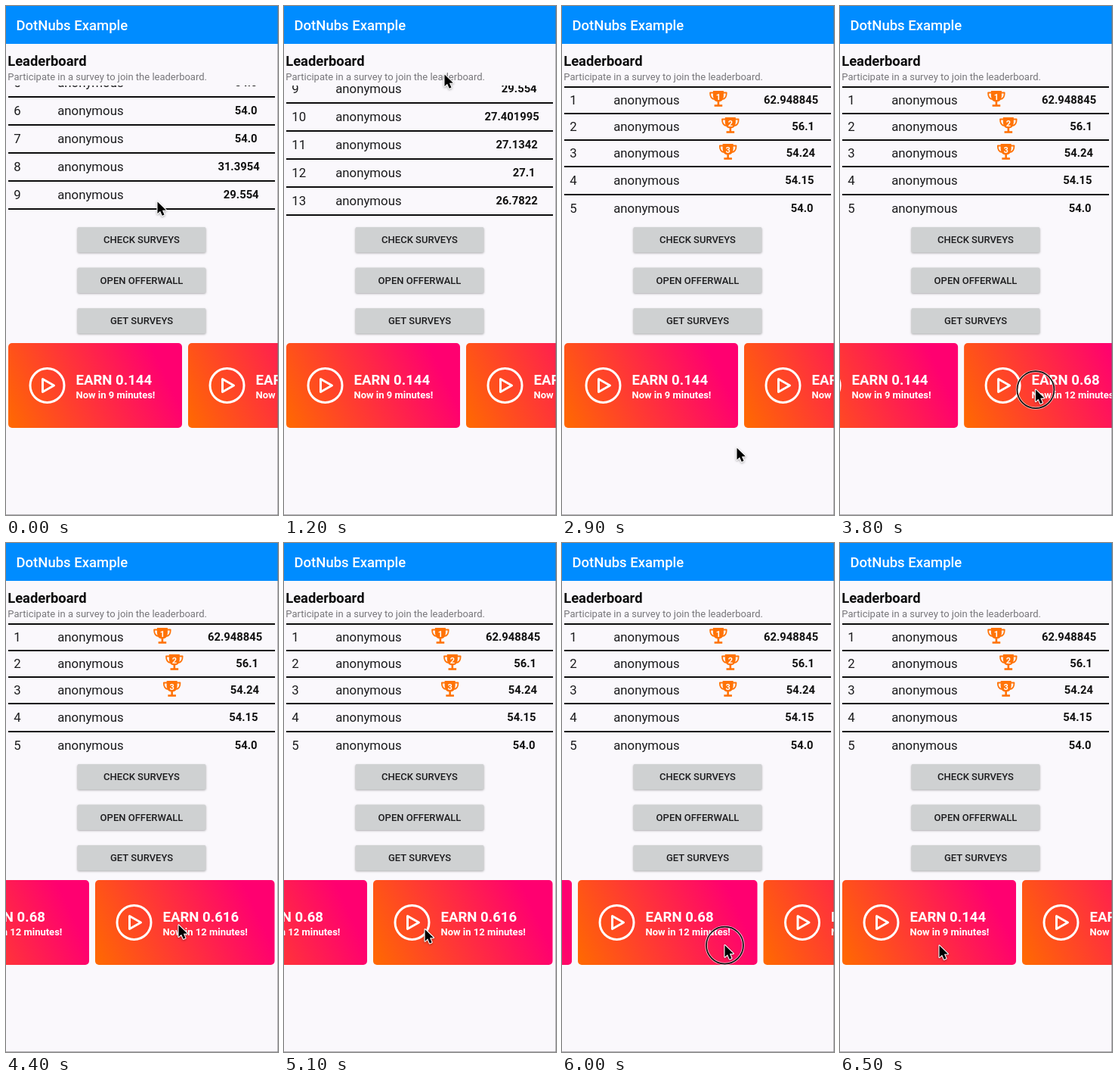
An HTML page with a canvas that plays this animation: 360 by 672 pixels, repeating every 6.6 s.

```html
<!DOCTYPE html>
<html lang="en">
<head>
<meta charset="utf-8">
<title>Leaderboard</title>
<style>
html, body { margin: 0; width: 100%; height: 100%; overflow: hidden; background: #faf8fc; }
canvas { display: block; width: 360px; height: 672px; }
</style>
</head>
<body>
<canvas id="stage"></canvas>
<script>
const W = 360, H = 672, LOOP = 6600, STEP = 100;
const canvas = document.getElementById('stage');
const ctx = canvas.getContext('2d');
const dpr = window.devicePixelRatio || 1;
canvas.width = W * dpr;
canvas.height = H * dpr;

const SCORES = ['62.948845', '56.1', '54.24', '54.15', '54.0', '54.0', '54.0', '31.3954',
  '29.554', '27.401995', '27.1342', '27.1', '26.7822', '25.435', '25.056'];
const BUTTONS = ['CHECK SURVEYS', 'OPEN OFFERWALL', 'GET SURVEYS'];
const CARDS = [
  { w: 230, pay: '0.144', min: 9 },
  { w: 237.5, pay: '0.68', min: 12 },
  { w: 237.5, pay: '0.616', min: 12 }
];

// Pointer gestures; the touch ring shows while dragging
const MOVES = [
  { from: 400, to: 1150, dx: 12, dy: -168, drag: true },
  { from: 1350, to: 1700, dx: 0, dy: 54 },
  { from: 1800, to: 2650, dx: 19, dy: 439, drag: true },
  { from: 2900, to: 3500, dx: 70, dy: -74 },
  { from: 3550, to: 4000, dx: -73, dy: -5, drag: true },
  { from: 4900, to: 5400, dx: -119, dy: 16 },
  { from: 5615, to: 6050, dx: 110, dy: 11, drag: true },
  { from: 6050, to: 6450, dx: -88, dy: 0 }
];

function smooth(t, from, to) {
  const u = Math.min(1, Math.max(0, (t - from) / (to - from)));
  return u * u * (3 - 2 * u);
}

const listScroll = t => 165.6 + 205.9 * smooth(t, 400, 1685) - 371.5 * smooth(t, 1800, 2650);
const cardScroll = t => 368.5 * (smooth(t, 3550, 4400) - smooth(t, 5615, 6500));

function pointer(t) {
  const p = { x: 200, y: 258, pressed: false };
  for (const { from, to, dx, dy, drag } of MOVES) {
    const k = smooth(t, from, to);
    p.x += dx * k;
    p.y += dy * k;
    if (drag && t >= from && t < to) p.pressed = true;
  }
  return p;
}

function text(str, x, y, size, weight, color, align = 'left') {
  ctx.font = `${weight} ${size}px Roboto, sans-serif`;
  ctx.fillStyle = color;
  ctx.textAlign = align;
  ctx.fillText(str, x, y);
}

function rect(x, y, w, h, color) {
  ctx.fillStyle = color;
  ctx.fillRect(x, y, w, h);
}

function round(x, y, w, h, r, fill) {
  ctx.beginPath();
  ctx.roundRect(x, y, w, h, r);
  ctx.fillStyle = fill;
  ctx.fill();
}

function shadow(color, blur, dy) {
  ctx.shadowColor = color;
  ctx.shadowBlur = blur * dpr;
  ctx.shadowOffsetY = dy * dpr;
}

function trophy(x, y, n) {
  const color = '#ff7307';
  ctx.save();
  ctx.translate(x, y);
  ctx.strokeStyle = color;
  ctx.lineWidth = 1.8;
  for (const s of [-1, 1]) {
    ctx.beginPath();
    ctx.moveTo(s * 6, -7.5);
    ctx.lineTo(s * 10.8, -7.5);
    ctx.quadraticCurveTo(s * 11, 0.5, s * 5, 1.2);
    ctx.stroke();
  }
  ctx.beginPath();
  ctx.moveTo(-7, -10);
  ctx.lineTo(7, -10);
  ctx.lineTo(7, -3);
  ctx.quadraticCurveTo(6.5, 4.5, 0, 4.5);
  ctx.quadraticCurveTo(-6.5, 4.5, -7, -3);
  ctx.fillStyle = color;
  ctx.fill();
  rect(-1.3, 4, 2.6, 5, color);
  rect(-5.3, 8.2, 10.6, 2.6, color);
  text(n, 0, 1.6, 11, 700, '#fff', 'center');
  ctx.restore();
}

function drawList(scroll) {
  ctx.save();
  ctx.beginPath();
  ctx.rect(0, 105, W, 174);
  ctx.clip();
  let top = 106.5 - scroll;
  SCORES.forEach((score, i) => {
    const medal = i < 3;
    const height = medal ? 35 : 37;
    const mid = top + height / 2;
    rect(3, Math.round(top) - 1, 353, 2, '#0b0b0c');
    text(i + 1, 10.2, mid + 5.9, 16.8, 400, '#1b1b1d');
    text('anonymous', 68.2, mid + 5.9, 16.8, 400, '#1b1b1d');
    ctx.font = '700 14.8px Roboto, sans-serif';
    const w = ctx.measureText(score).width;
    text(score, 329 + 0.12 * w + (medal ? 1.5 : 0), mid + 4.9, 14.8, 700, '#111', 'right');
    if (medal) trophy(234 - 0.375 * w, mid - 2, i + 1);
    top += height;
  });
  ctx.restore();
}

function drawButton(label, i) {
  const y = 292 + 53.5 * i;
  ctx.save();
  shadow('rgba(0,0,0,.3)', 2.5, 1);
  round(94.5, y, 170, 33.5, 2, '#cfd1d2');
  ctx.restore();
  text(label, 179.5, y + 21.4, 13, 500, '#1d1d1f', 'center');
}

function drawCard({ w, pay, min }, left) {
  const fill = ctx.createLinearGradient(left, 557, left + w, 445);
  fill.addColorStop(0, '#ff6a00');
  fill.addColorStop(0.85, '#ff0070');
  round(left, 445, w, 112, 5, fill);

  const cx = left + 51.5, cy = 501;
  ctx.strokeStyle = '#fff';
  ctx.lineJoin = 'round';
  ctx.lineWidth = 3;
  ctx.beginPath();
  ctx.arc(cx, cy, 22.5, 0, Math.PI * 2);
  ctx.stroke();
  ctx.beginPath();
  ctx.moveTo(cx - 6, cy - 8.5);
  ctx.lineTo(cx + 9, cy);
  ctx.lineTo(cx - 6, cy + 8.5);
  ctx.closePath();
  ctx.stroke();

  text('EARN ' + pay, left + 89.5, 500, 18.6, 700, '#fff');
  text(`Now in ${min} minutes!`, left + 89.5, 518.3, 13, 700, '#fff');
}

function drawPointer({ x, y, pressed }) {
  ctx.save();
  ctx.translate(x, y);
  if (pressed) {
    ctx.beginPath();
    ctx.arc(0.5, 0.5, 24.5, 0, Math.PI * 2);
    ctx.strokeStyle = 'rgba(255,255,255,.7)';
    ctx.lineWidth = 3.4;
    ctx.stroke();
    ctx.strokeStyle = '#111';
    ctx.lineWidth = 1.7;
    ctx.stroke();
  }
  ctx.beginPath();
  ctx.moveTo(0.5, 0.5);
  ctx.lineTo(0.5, 16);
  ctx.lineTo(4.1, 12.7);
  ctx.lineTo(6.8, 18.8);
  ctx.lineTo(9.5, 17.6);
  ctx.lineTo(6.9, 11.7);
  ctx.lineTo(11.8, 11.5);
  ctx.closePath();
  ctx.lineJoin = 'round';
  ctx.strokeStyle = '#fff';
  ctx.lineWidth = 2.2;
  shadow('rgba(0,0,0,.35)', 3, 1);
  ctx.stroke();
  ctx.shadowColor = 'transparent';
  ctx.fillStyle = '#000';
  ctx.fill();
  ctx.restore();
}

function draw(t) {
  ctx.setTransform(dpr, 0, 0, dpr, 0, 0);
  rect(0, 0, W, H, '#faf8fc');
  rect(0, 0, W, 50, '#008cff');
  text('DotNubs Example', 13.5, 32, 18.5, 500, '#fff');
  text('Leaderboard', 2.2, 79.2, 18.4, 700, '#0c0c0d');
  text('Participate in a survey to join the leaderboard.', 2.3, 98.3, 13, 400, '#77767a');

  drawList(listScroll(t));
  BUTTONS.forEach(drawButton);
  let left = 3 - cardScroll(t);
  for (const card of CARDS) {
    drawCard(card, left);
    left += card.w + 8;
  }

  rect(359, 0, 1, H, 'rgba(110,110,115,.5)');
  rect(0, 671, W, 1, 'rgba(110,110,115,.5)');
  drawPointer(pointer(t));
}

let start;
function tick(now) {
  start ??= now;
  const t = (now - start) % LOOP;
  draw(Math.floor(t / STEP) * STEP);
  requestAnimationFrame(tick);
}
draw(0);
requestAnimationFrame(tick);
</script>
</body>
</html>
```
